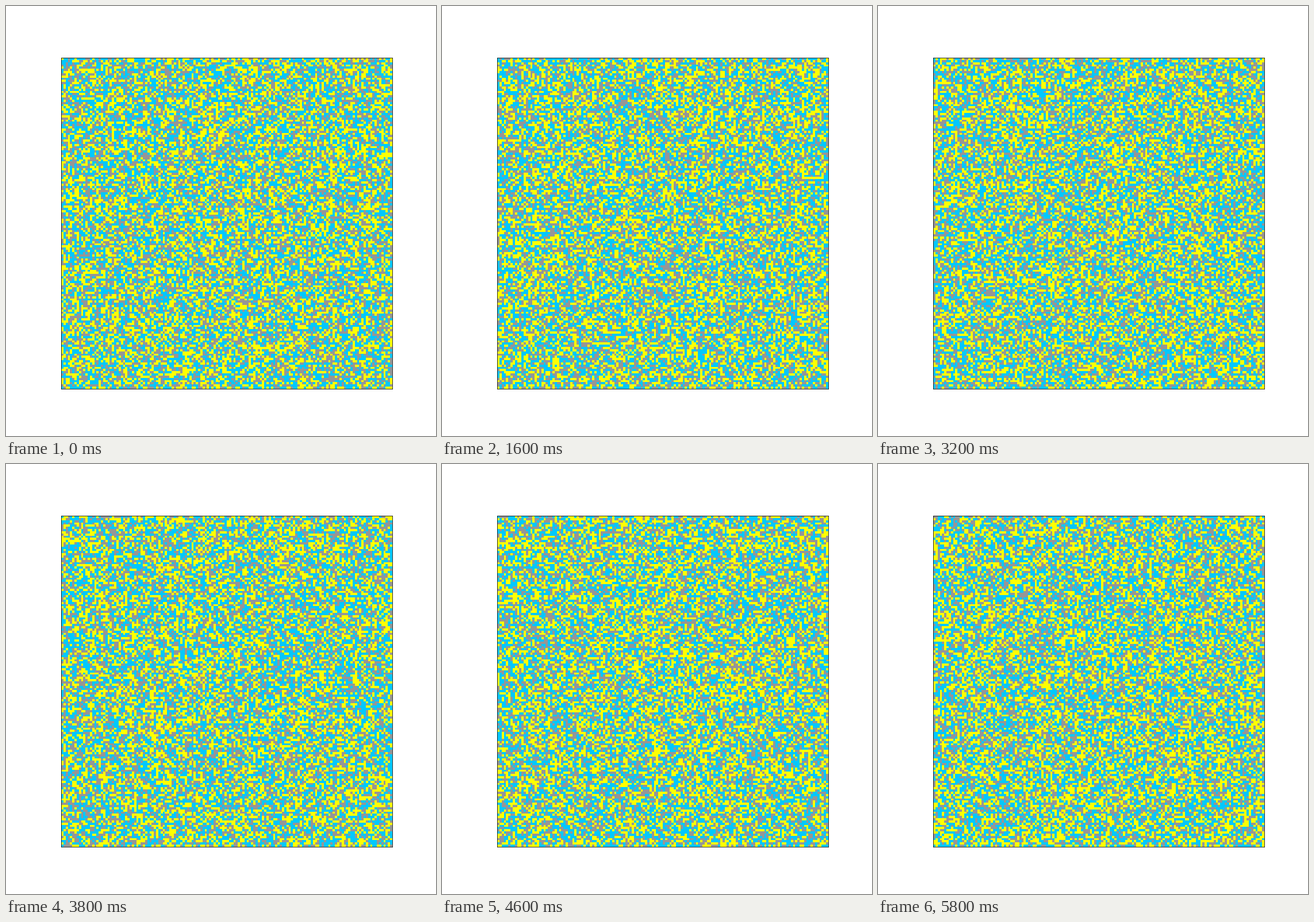
Write a matplotlib script that moves like this. It is 748 by 748 pixels and loops after 6000 ms.

```python
import numpy as np
import matplotlib.pyplot as plt
from matplotlib.animation import FuncAnimation

SIZE, DPI = 748, 72
CELLS = 150
FRAMES, INTERVAL = 30, 200
COLORS = np.array([(0, 200, 255), (255, 255, 0), (150, 150, 150)], dtype=np.uint8)
SHARES = (0.37, 0.35, 0.28)


def noise(step):
    """Random three-colour grid, fixed by its step."""
    rng = np.random.default_rng(1000 + step)
    return COLORS[rng.choice(3, size=(CELLS, CELLS), p=SHARES)]


fig = plt.figure(figsize=(SIZE / DPI, SIZE / DPI), dpi=DPI, facecolor="white")
ax = fig.add_axes([96 / SIZE, 82 / SIZE, 576 / SIZE, 576 / SIZE])
ax.set_xticks([])
ax.set_yticks([])
for spine in ax.spines.values():
    spine.set_linewidth(0.8)
grid = ax.imshow(noise(1), interpolation="nearest", aspect="auto")


def update(i):
    # the opening grid holds for two steps
    grid.set_data(noise(max(i, 1)))
    return (grid,)


anim = FuncAnimation(fig, update, frames=FRAMES, interval=INTERVAL,
                     repeat=True, repeat_delay=0, blit=False)
plt.show()
```
